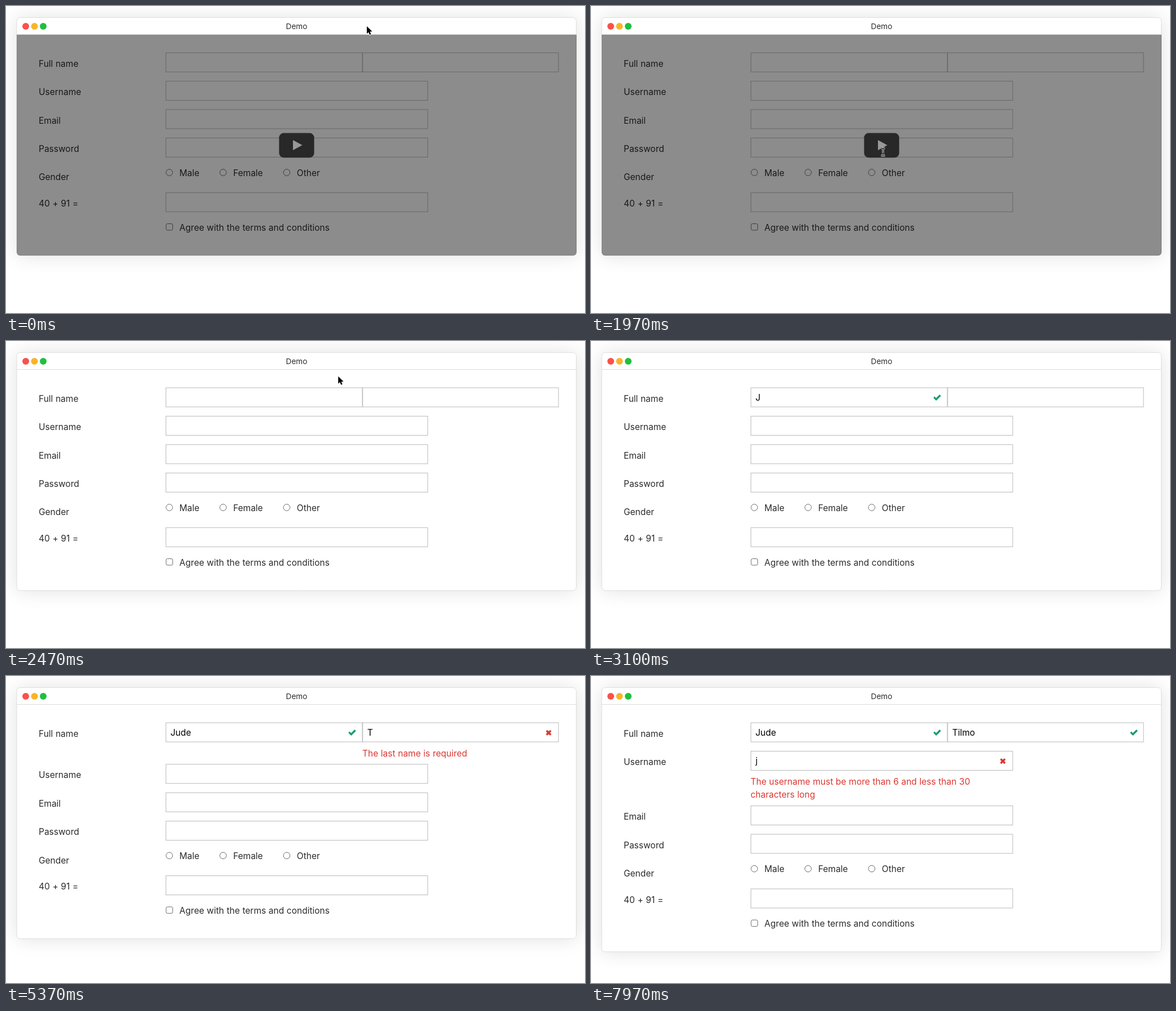
These frames come from a looping animation (1027 px wide and 545 px high, 8000 ms). An HTML page with a canvas:

```html
<!DOCTYPE html>
<html lang="en">
<head>
<meta charset="utf-8">
<title>Form demo</title>
<style>
html, body { margin: 0; width: 100%; height: 100%; overflow: hidden; background: #fff; }
canvas { display: block; }
</style>
</head>
<body>
<canvas id="stage" width="1027" height="545"></canvas>
<script>
const ctx = document.getElementById('stage').getContext('2d');
const LOOP = 8000, LINE = 23.3, ROW = 50.44, TOP = 83;
const LEFT = 283, MID = 632, RIGHT = 980, END = 748;
const RED = '#dc3630', GREEN = '#189c6d', INK = '#2b2b2b';
const FIRST = 'Jude', LAST = 'Tilmo';

// Moments at which the form changes
const T = {
  ibeam: 1970, play: 2000, firstError: 2740, firstKey: 3040, firstFull: 4300,
  lastError: 4330, lastKey: 5370, lastFull: 6800, userError: 6830, userKey: 7830, hide: 2730
};
const SETTLE = 30;

// Cursor stops: time, x, y
const PATH = [[1070, 640, 36], [1540, 519, 266], [1700, 518, 259], [2100, 518, 259], [2580, 600, 33]];

const clamp = v => Math.max(0, Math.min(1, v));
const smooth = v => v * v * (3 - 2 * v);
const within = (t, a, b) => t >= a && t < b;

function text(str, x, y, color = INK, size = 15.5, align = 'left') {
  ctx.font = `${size}px Inter, sans-serif`;
  ctx.wordSpacing = '0.3px';
  ctx.textAlign = align;
  ctx.fillStyle = color;
  ctx.fillText(str, x, y);
}

function round(x, y, w, h, r) {
  ctx.beginPath();
  ctx.roundRect(x, y, w, h, r);
}

function disc(x, y, r) {
  ctx.beginPath();
  ctx.arc(x, y, r, 0, Math.PI * 2);
}

function poly(points, x = 0, y = 0) {
  ctx.beginPath();
  points.forEach(([px, py]) => ctx.lineTo(x + px, y + py));
  ctx.closePath();
}

function field(x, right, y, value = '') {
  ctx.strokeStyle = '#b9b9b9';
  ctx.lineWidth = 1;
  ctx.strokeRect(x + 0.7, y, right - x - 0.7, 34);
  if (value) text(value, x + 8.7, y + 22.7, '#000');
}

function tick(x, y) {
  ctx.fillStyle = GREEN;
  poly([[-6.8, 0.4], [-4.5, -1.8], [-1.8, 0.8], [4.4, -5.3], [6.8, -3], [-1.8, 5.6]], x, y);
  ctx.fill();
}

function cross(x, y) {
  ctx.strokeStyle = RED;
  ctx.lineWidth = 3.5;
  ctx.beginPath();
  for (const s of [-1, 1]) {
    ctx.moveTo(x - 3.8, y - 3.8 * s);
    ctx.lineTo(x + 3.8, y + 3.8 * s);
  }
  ctx.stroke();
}

function error(t, since, x, right, y, lines) {
  ctx.globalAlpha = 0.3 + 0.7 * clamp((t - since) / 90);
  cross(right - 17.5, y + 17.7);
  lines.forEach((line, i) => text(line, x, y + 59.6 + i * LINE, RED));
  ctx.globalAlpha = 1;
}

function panel(height) {
  ctx.save();
  ctx.shadowColor = 'rgba(0,0,0,.12)';
  ctx.shadowBlur = 34;
  ctx.shadowOffsetY = 1;
  ctx.fillStyle = '#fff';
  round(19, 20, 993, height, 6);
  ctx.fill();
  ctx.restore();
  ctx.strokeStyle = '#dedede';
  ctx.lineWidth = 1;
  round(19, 20.5, 992.5, height - 0.5, 6);
  ctx.stroke();
  ctx.fillStyle = '#dedede';
  ctx.fillRect(19, 50, 993, 1);
  ['#fa514b', '#fab42b', '#1fc03d'].forEach((color, i) => {
    ctx.fillStyle = color;
    disc(35 + i * 15.5, 36, 6);
    ctx.fill();
  });
  text('Demo', 515.5, 41, INK, 13.6, 'center');
}

function options(y) {
  ctx.lineWidth = 1;
  [['Male', 289.7], ['Female', 385.1], ['Other', 497.9]].forEach(([name, x]) => {
    ctx.strokeStyle = '#6c6c6c';
    disc(x, y, 5.8);
    ctx.stroke();
    text(name, x + 17.9, y + 6.1);
  });
}

function terms(y) {
  ctx.strokeStyle = '#6c6c6c';
  ctx.lineWidth = 1;
  round(284, y - 6, 11.7, 11.5, 2.5);
  ctx.stroke();
  text('Agree with the terms and conditions', 307.6, y + 6.1);
}

function form(t) {
  const firstBad = within(t, T.firstError, T.firstKey + SETTLE);
  const lastBad = within(t, T.lastError, T.lastKey + SETTLE);
  const userBad = t >= T.userError;
  const longMsg = t >= T.userKey + SETTLE;
  const nameGap = firstBad || lastBad ? LINE : 0;
  const userGap = longMsg ? 2 * LINE : userBad ? LINE : 0;
  const gap = nameGap + userGap;
  const userY = TOP + ROW + nameGap;
  const below = n => TOP + n * ROW + gap;

  panel(423 + gap);

  const first = t < T.firstKey ? '' : t < T.firstFull ? FIRST[0] : FIRST;
  const last = t < T.lastKey ? '' : t < T.lastFull ? LAST[0] : LAST;
  text('Full name', 58, TOP + 24.7);
  field(LEFT, MID, TOP, first);
  field(MID, RIGHT, TOP, last);
  text('Username', 58, userY + 24.7);
  field(LEFT, END, userY, t >= T.userKey ? 'j' : '');
  ['Email', 'Password'].forEach((name, i) => {
    text(name, 58, below(i + 2) + 24.7);
    field(LEFT, END, below(i + 2));
  });
  text('Gender', 58, below(4) + 24.7);
  options(295.5 + gap);
  text('40 + 91 =', 58, 356 + gap);
  field(LEFT, END, 331.3 + gap);
  terms(392.5 + gap);

  if (firstBad) error(t, T.firstError, LEFT, MID, TOP, ['The first name is required']);
  if (lastBad) error(t, T.lastError, MID, RIGHT, TOP, ['The last name is required']);
  if (userBad) error(t, T.userError, LEFT, END, userY, longMsg
    ? ['The username must be more than 6 and less than 30', 'characters long']
    : ['The username is required']);
  if (t >= T.firstKey + SETTLE) tick(614, 100.4);
  if (t >= T.lastKey + SETTLE) tick(963, 100.4);
}

function cover() {
  ctx.fillStyle = 'rgba(0,0,0,.45)';
  round(19, 51, 993, 392, [0, 0, 6, 6]);
  ctx.fill();
  ctx.fillStyle = '#282828';
  round(484.4, 225.6, 62.2, 43.6, 8);
  ctx.fill();
  ctx.fillStyle = '#989898';
  poly([[509, 238], [525.5, 247], [509, 256]]);
  ctx.fill();
}

function arrow() {
  poly([[0, 0], [0, 13.2], [3, 10.4], [5.1, 15], [7.4, 14], [5.4, 9.5], [9.5, 9.3]]);
  ctx.fillStyle = '#000';
  ctx.strokeStyle = '#fff';
  ctx.lineWidth = 2;
  ctx.stroke();
  ctx.fill();
}

function hand() {
  poly([[-1.5, 0], [1, 0], [1.6, 5], [7.5, 6.5], [9, 8.5], [8, 13], [6.5, 16], [0, 16], [-5, 9.5], [-4, 8], [-1.5, 9.5]]);
  ctx.fillStyle = '#fff';
  ctx.strokeStyle = '#000';
  ctx.lineWidth = 1;
  ctx.lineJoin = 'round';
  ctx.fill();
  ctx.stroke();
}

function ibeam() {
  for (const [color, width] of [['#fff', 3], ['#111', 1.3]]) {
    ctx.strokeStyle = color;
    ctx.lineWidth = width;
    ctx.beginPath();
    for (const s of [-1, 1]) {
      ctx.moveTo(-3.5, 7 * s);
      ctx.quadraticCurveTo(0, 7 * s, 0, 4.5 * s);
      ctx.quadraticCurveTo(0, 7 * s, 3.5, 7 * s);
    }
    ctx.moveTo(0, -5);
    ctx.lineTo(0, 5);
    ctx.moveTo(-2, 2.5);
    ctx.lineTo(2, 2.5);
    ctx.stroke();
  }
}

function place(t) {
  let [, x, y] = PATH[0];
  for (let i = 1; i < PATH.length; i++) {
    const [t0, x0, y0] = PATH[i - 1], [t1, x1, y1] = PATH[i];
    if (t < t0) break;
    const k = smooth(clamp((t - t0) / (t1 - t0)));
    x = x0 + (x1 - x0) * k;
    y = y0 + (y1 - y0) * k;
  }
  return [x, y];
}

function overInput(y) {
  return [0, 1, 2, 3].some(n => within(y, TOP + n * ROW, TOP + n * ROW + 34));
}

function cursor(t) {
  if (t >= T.hide) return;
  const [x, y] = place(t);
  ctx.save();
  ctx.translate(x, y);
  if (y < 51) arrow();
  else if (t < T.ibeam) hand();
  else if (overInput(y)) ibeam();
  else arrow();
  ctx.restore();
}

const start = performance.now();
function draw() {
  const t = (performance.now() - start) % LOOP;
  ctx.fillStyle = '#fff';
  ctx.fillRect(0, 0, 1027, 545);
  form(t);
  if (t < T.play) cover();
  cursor(t);
  requestAnimationFrame(draw);
}
draw();
</script>
</body>
</html>
```
